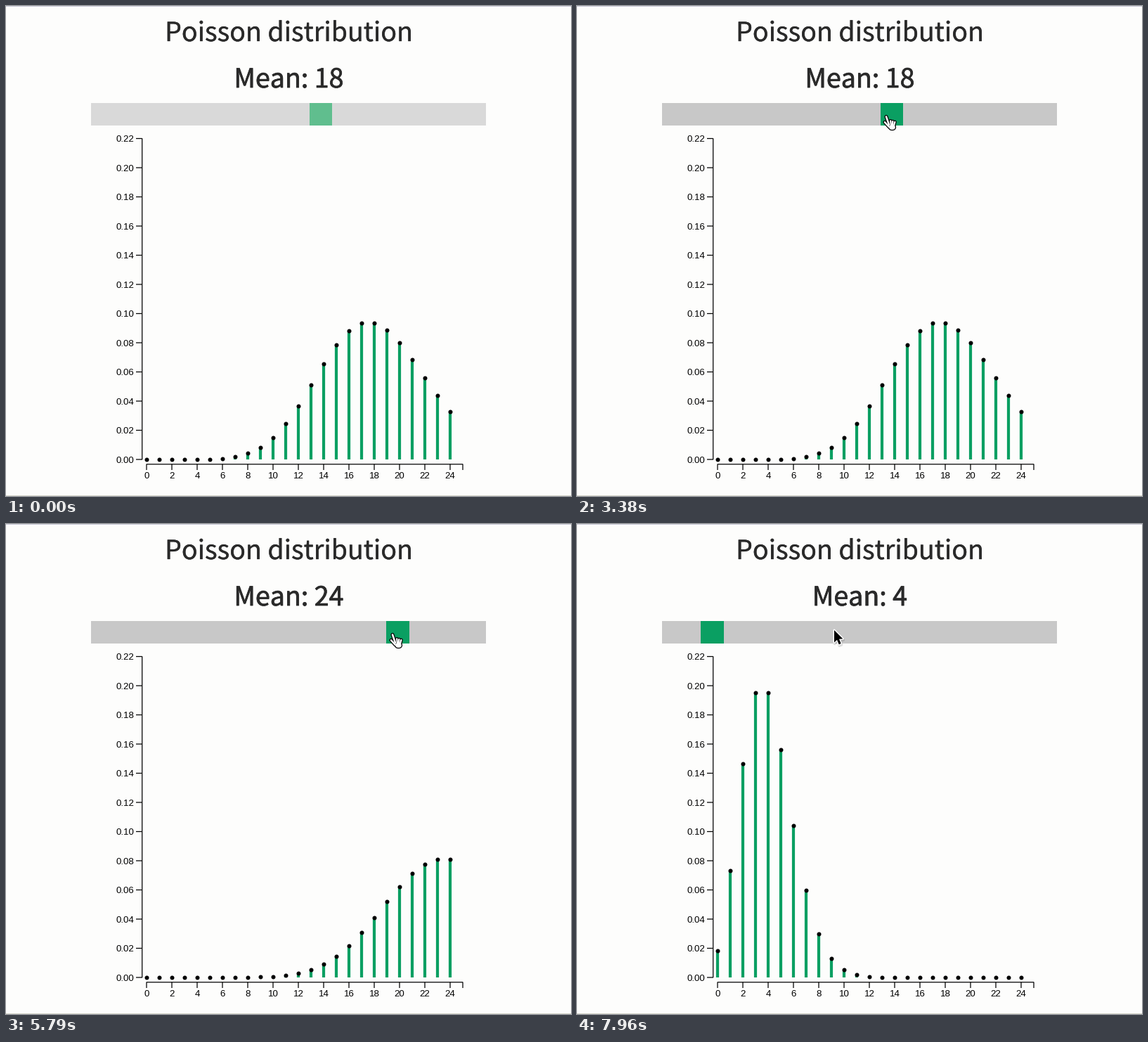
Recreate the animation shown at these times as a matplotlib script. Size 804x697 px, loop 8 s.

```python
import math

import matplotlib.pyplot as plt
import numpy as np
from matplotlib.animation import FuncAnimation
from matplotlib.patches import Polygon, Rectangle
from matplotlib.patheffects import withStroke
from matplotlib.transforms import Affine2D

W, H, DPI = 804, 697, 64
PT = 72 / DPI  # points per pixel
FRAMES, STEP = 200, 40

INK = "#2a2a2a"
GREEN, GREEN_PALE = "#0a9f62", "#60be8e"
TRACK, TRACK_PALE = "#c8c8c8", "#d9d9d9"

X0, DX = 200, 18
Y0, Y_SCALE = 645, 456.5 / 0.22
BAR_TOP, BAR_H = 137.8, 32.5
SLOT, SLOT_X0, HANDLE_W = 18.25, 103, 32.7

# Pointer moves: leave, arrive, x, y
START = (830, 325)
MOVES = [
    (0, 1700, 436, 156),
    (3440, 4160, 299, 155),
    (4240, 4620, 222, 155),
    (4620, 5080, 352, 156),
    (5180, 5680, 546, 156),
    (5860, 6500, 317, 174),
    (6620, 7000, 546, 156),
    (7150, 7740, 180, 155),
    (7760, 7940, 366, 151),
]
FOCUS = 2700  # the page reacts to the pointer from here on
DRAGS = [(1700, 5860), (7000, 7750)]

fig = plt.figure(figsize=(W / DPI, H / DPI), dpi=DPI, facecolor="#fdfdfc")
ax = fig.add_axes([0, 0, 1, 1])
ax.set_xlim(0, W)
ax.set_ylim(H, 0)
ax.axis("off")


def line(xs, ys, color="black", width=1.25):
    return ax.plot(xs, ys, color=color, lw=width * PT, snap=False,
                   solid_capstyle="butt", solid_joinstyle="miter")[0]


def label(x, y, text, size=13.3, font="Liberation Sans", ha="center",
          color="black"):
    return ax.text(x, y, text, fontsize=size * PT, family=font, ha=ha,
                   va="baseline", color=color)


def heading(y, text, weight):
    item = label(402.5, y, text, 37.6, "Noto Sans CJK JP", color=INK)
    item.set_path_effects([withStroke(linewidth=weight * PT, foreground=INK)])
    return item


line([0, W], [0.5, 0.5], "#c9c9d6", 1)
line([0, W], [696.5, 696.5], "#d6d6cc", 1)
heading(50, "Poisson distribution", 0.25)
mean_text = heading(116, "", 0.7)

track = ax.add_patch(Rectangle((121.3, BAR_TOP), 561.5, BAR_H, lw=0))
handle = ax.add_patch(Rectangle((0, BAR_TOP), HANDLE_W, BAR_H, lw=0))

line([185, 193.7, 193.7, 185], [188.5, 188.5, Y0, Y0])
for i in range(12):
    y = Y0 - i * 0.02 * Y_SCALE
    if 0 < i < 11:
        line([185, 193.7], [y, y])
    label(182, y + 4.6, f"{i * 0.02:.2f}", ha="right")

line([X0, X0, X0 + 25 * DX, X0 + 25 * DX], [660, 651.8, 651.8, 660])
for k in range(0, 25, 2):
    x = X0 + k * DX
    if k:
        line([x, x], [651.8, 660])
    label(x, 672.3, str(k))

counts = np.arange(25)
xs = X0 + DX * counts
log_fact = np.array([math.lgamma(k + 1) for k in counts])
stems = ax.vlines(xs, Y0, Y0, color=GREEN, lw=4.2 * PT, zorder=3)
dots, = ax.plot(xs, xs * 0 + Y0, "o", color="black", ms=6 * PT, mew=0,
                zorder=4)

shift = Affine2D()  # carries both pointer shapes


def outline(width, color, alpha, z, offset=(0, 0)):
    points = [(0, 0), (0, 17.5), (4, 13.8), (6.7, 20.3), (9.7, 19),
              (7, 12.7), (12.3, 12.3)]
    return ax.add_patch(Polygon(
        np.add(points, offset), fc="black", ec=color, lw=width * PT,
        alpha=alpha, zorder=z, joinstyle="round",
        transform=shift + ax.transData))


def limb(tip, root, width):
    """A rounded white stroke over a wider black one."""
    ends = np.array([tip, root]).T
    return [ax.plot(*ends, color=color, lw=(width + extra) * PT, zorder=z,
                    solid_capstyle="round",
                    transform=shift + ax.transData)[0]
            for color, extra, z in (("black", 2.5, 11), ("white", 0, 12))]


arrow = [outline(4, "black", 0.12, 10, (0.7, 1.8)),
         outline(3, "white", 1, 11), outline(0, "none", 1, 12)]
hand = (limb((4, 1.4), (8, 13), 2.6) + limb((1.9, 9.2), (8, 16), 2.4)
        + limb((10.6, 15.8), (13.4, 15.8), 6.8))
for i in range(3):
    hand += limb((10.2 + 3.1 * i, 7.3 + 0.8 * i), (11 + 2 * i, 14), 2.3)


def pointer(t):
    pos = np.array(START, float)
    for leave, arrive, x, y in MOVES:
        u = np.clip((t - leave) / (arrive - leave), 0, 1)
        pos += (np.array((x, y)) - pos) * u * u * (3 - 2 * u)
    return pos


def mean_at(t):
    """The slider snaps to the slot under the pointer during a drag."""
    start, end = DRAGS[t >= DRAGS[1][0]]
    x, _ = pointer(np.clip(t, start, end))
    return round((x - 106.7) / SLOT)


def draw(frame):
    t = frame * STEP
    x, y = pointer(t)
    mean = mean_at(t)
    left = SLOT_X0 + SLOT * mean
    hot = t >= FOCUS and BAR_TOP <= y <= BAR_TOP + BAR_H
    grab = hot and left - 18 <= x <= left + HANDLE_W

    mean_text.set_text(f"Mean: {mean}")
    track.set_facecolor(TRACK if hot else TRACK_PALE)
    handle.set_facecolor(GREEN if hot else GREEN_PALE)
    handle.set_x(left)

    tops = Y0 - Y_SCALE * np.exp(counts * math.log(mean) - mean - log_fact)
    stems.set_segments([[(a, Y0), (a, b)] for a, b in zip(xs, tops)])
    dots.set_ydata(tops)

    shift.clear().translate(x, y)
    for part in arrow:
        part.set_visible(not grab)
    for part in hand:
        part.set_visible(grab)
    return []


anim = FuncAnimation(fig, draw, frames=FRAMES, interval=STEP, repeat=True,
                     repeat_delay=0, blit=False)
plt.show()
```
